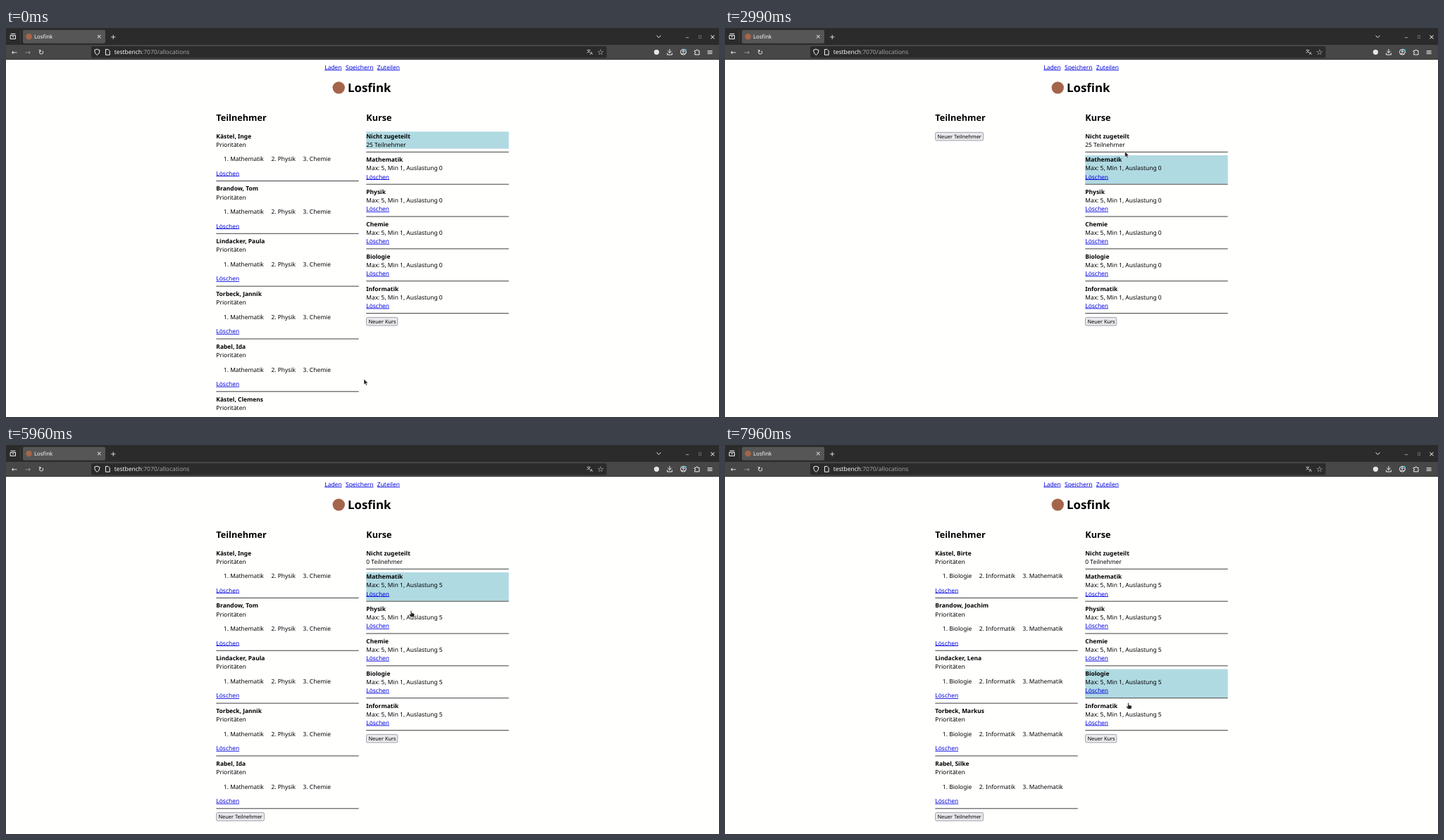
These frames come from a looping animation (1012x553 px, 7.99 s). An HTML page:

```html
<!DOCTYPE html>
<html lang="de">
<head>
<meta charset="utf-8">
<title>Losfink</title>
<style>
  html, body { margin: 0; width: 100%; height: 100%; overflow: hidden; background: #fff; }
  svg { display: block; width: 100vw; height: 100vh; }
  text { font: 16px "Noto Sans", sans-serif; text-rendering: geometricPrecision; white-space: pre; }
  .b { font-weight: 700; }
  .h1 { font-size: 32px; font-weight: 700; }
  .h2 { font-size: 24px; font-weight: 700; }
  .link { fill: #0000e0; text-decoration: underline; }
  .button { font-size: 14px; }
  .glyph { font-family: "DejaVu Sans", "Noto Sans CJK JP", sans-serif; fill: #f4f4f6; text-anchor: middle; }
  .icon { fill: none; stroke: #f4f4f6; stroke-linecap: round; stroke-linejoin: round; }
</style>
</head>
<body>
<svg viewBox="0 0 1012 553">
  <rect width="1012" height="553" fill="#fffffe"/>
  <g id="page" transform="scale(.52708)"></g>
  <rect id="scrollbar" x="1009.7" y="47" width="2.3" height="120" fill="#777"/>

  <!-- browser window -->
  <rect width="1012" height="24.5" fill="#2b2b2b"/>
  <rect y="24" width="1012" height="21" fill="#474747"/>
  <path d="M0 44.8H1012" stroke="#1c1c1c" stroke-width=".6"/>
  <path d="M20.5 4V20.5" stroke="#4a4a4a" stroke-width=".6"/>
  <rect x="24" y="2.8" width="117" height="19" rx="2.2" fill="#565656"/>
  <rect x="121" y="26" width="731.5" height="16.5" rx="2.2" fill="#2b2b2b"/>
  <circle cx="32.6" cy="12.2" r="4.3" fill="#a5654a"/>
  <text x="40" y="15" fill="#fbfbfe" style="font-size:7.8px">Losfink</text>
  <text x="153.7" y="37.2" fill="#fbfbfe" style="font-size:8.45px">testbench<tspan fill="#a3a3a3">:7070/allocations</tspan></text>
  <g id="glyphs"></g>
  <g class="icon">
    <path d="M6.5 10.5h7v5h-7zM7 8.3h6M9 12.6h2"/>
    <path d="M923.8 11l2.7 2.6 2.7-2.6"/>
    <path d="M129.4 30.2l3.6 1.3q0 5.3-3.6 6.8q-3.6-1.5-3.6-6.8z"/>
    <path d="M141.8 30.4h3.2l2.2 2.2v5.6h-5.4z"/>
    <path d="M942 30.3v5m-2.4-2.3l2.4 2.4 2.4-2.4M938.6 36v2h6.8v-2"/>
    <path d="M977.6 32.3h2q1.2-3.4 2.4 0h2v5.6h-6.4v-2q2.8-.9 0-1.8z"/>
    <circle cx="961.3" cy="34.2" r="3.9"/><circle cx="961.3" cy="33" r="1.2"/>
    <path d="M959 36.8q2.3-2.4 4.6 0"/>
  </g>
  <circle cx="923.4" cy="34.3" r="3.6" fill="#e6e6e8"/>
  <circle cx="964.6" cy="31.2" r="1.3" fill="#27c4e8"/>

  <g id="cursor" stroke="#fff" stroke-width=".5" stroke-linejoin="round" fill="#222">
    <path id="arrow" d="M0 0V8L1.9 6.3 3.2 9.2 4.6 8.6 3.4 5.8H5.9Z"/>
    <path id="hand" d="M-.8 .5Q0-.5 .8 .5V3.2L4 3.9Q4.9 4.2 4.8 5.2L4.2 8.8H-.7L-3 5.4Q-3 4.3-1.9 4.8L-.8 5.6Z"/>
  </g>
</svg>
<script>
const LOOP = 7990, HIGHLIGHT_LAG = 60;
// Page units: the page is laid out at full size and scaled down.
const SCALE = .52708, TOP = 279.5, LEFT = 566, RIGHT = 970, COLUMN = 384;
const FIRST_COURSE = TOP + 64, COURSE_STEP = 87, PERSON_STEP = 142;
const NAV_BOTTOM = 62;

const courses = ['Mathematik', 'Physik', 'Chemie', 'Biologie', 'Informatik'];
const surnames = ['Kästel', 'Brandow', 'Lindacker', 'Torbeck', 'Rabel'];
const firstNames = [
  'Inge', 'Tom', 'Paula', 'Jannik', 'Ida',
  'Clemens', 'Greta', 'Hanno', 'Ilka', 'Jens',
  'Judith', 'Emil', 'Helga', 'Arne', 'Knut',
  'Birte', 'Joachim', 'Lena', 'Markus', 'Silke'];

// Each move ends on something that is then clicked.
const rest = { x: 508, y: 499 };
const moves = [
  { from: 1140, to: 1920, click: 2180, x: 570.5, y: 207 },
  { from: 2720, to: 3360, click: 3440, x: 566, y: 160 },
  { from: 3530, to: 3880, click: 4740, x: 543, y: 57 },
  { from: 5140, to: 5540, click: 5640, x: 569, y: 204 },
  { from: 5700, to: 6220, click: 6300, x: 577, y: 246 },
  { from: 6370, to: 6900, click: 6980, x: 571.5, y: 290.5 },
  { from: 7200, to: 7400, click: 7640, x: 571, y: 338 },
  { from: 7700, to: 7960, click: LOOP, x: 572.5, y: 366.5 }];

const $ = id => document.getElementById(id);
const text = (x, y, content, cls = '') => `<text x="${x}" y="${y}" class="${cls}">${content}</text>`;
const line = (x, top, row, content, cls) => text(x, top + 17.5 + row * 23, content, cls);
const rule = (x, y) => `<rect x="${x}" y="${y}" width="${COLUMN}" height="2" fill="#484848"/>`;
const button = (x, y, width, label) =>
  `<rect x="${x + .5}" y="${y + 2}" width="${width}" height="22" rx="3.5" fill="#e9e9ed" stroke="#85858f" stroke-width="1.4"/>` +
  text(x + 6, y + 18, label, 'button');

function person(index, top) {
  const group = Math.floor(index / 5);
  const wishes = [0, 1, 2].map(n =>
    `<tspan dx="${n ? 20 : 0}">${n + 1}. ${courses[(group + n) % 5]}</tspan>`).join('');
  return line(LEFT, top, 0, `${surnames[index % 5]}, ${firstNames[index]}`, 'b') +
    line(LEFT, top, 1, 'Prioritäten') +
    text(LEFT + 20, top + 79.5, wishes) +
    text(LEFT, top + 118.5, 'Löschen', 'link') +
    rule(LEFT, top + 132);
}

const rowTop = row => row ? FIRST_COURSE + (row - 1) * COURSE_STEP : TOP;
const rowHeight = row => row ? 77 : 46;

function courseRow(row, selected, assigned) {
  const top = rowTop(row), height = rowHeight(row);
  const background = row === selected
    ? `<rect x="${RIGHT}" y="${top}" width="${COLUMN}" height="${height}" fill="#b0dae2"/>` : '';
  const body = row
    ? line(RIGHT, top, 0, courses[row - 1], 'b') +
      line(RIGHT, top, 1, `Max: 5, Min 1, Auslastung ${assigned ? 5 : 0}`) +
      line(RIGHT, top, 2, 'Löschen', 'link')
    : line(RIGHT, top, 0, 'Nicht zugeteilt', 'b') +
      line(RIGHT, top, 1, `${assigned ? 0 : 25} Teilnehmer`);
  return background + body + rule(RIGHT, top + (row ? 77 : 54));
}

function renderPage(first, count, selected, assigned) {
  const people = Array.from({ length: count }, (_, i) => person(first + i, TOP + i * PERSON_STEP));
  const rows = [0, 1, 2, 3, 4, 5].map(row => courseRow(row, selected, assigned));
  return text(858, 112, 'Laden', 'link') + text(914.5, 112, 'Speichern', 'link') + text(999.5, 112, 'Zuteilen', 'link') +
    '<circle cx="896" cy="161" r="16.5" fill="#a5654a"/>' +
    text(920, 172.5, 'Losfink', 'h1') +
    text(LEFT, 251, 'Teilnehmer', 'h2') + text(RIGHT, 251, 'Kurse', 'h2') +
    people.join('') + button(LEFT, TOP + count * PERSON_STEP, 129, 'Neuer Teilnehmer') +
    rows.join('') + button(RIGHT, rowTop(6), 84, 'Neuer Kurs');
}

function rowAt({ x, y }) {
  if (x < RIGHT * SCALE) return -1;
  const py = y / SCALE;
  return [0, 1, 2, 3, 4, 5].findIndex(row => py >= rowTop(row) && py < rowTop(row) + rowHeight(row));
}

// The selected row, and whether people have been assigned, after all clicks up to t.
function stateAt(t) {
  const clicked = moves.filter(move => move.click <= t);
  const rows = clicked.map(rowAt).filter(row => row >= 0);
  return { selected: rows.at(-1) ?? 0, assigned: clicked.some(move => move.y < NAV_BOTTOM) };
}

function pointerAt(t) {
  let { x, y } = rest;
  for (const move of moves) {
    const left = 1 - Math.min(1, Math.max(0, (t - move.from) / (move.to - move.from)));
    const eased = 1 - left * left;
    x += (move.x - x) * eased;
    y += (move.y - y) * eased;
  }
  return { x, y };
}

function drawGlyphs() {
  const glyph = (char, x, y, size) =>
    `<text class="glyph" x="${x}" y="${y + size * .33}" style="font-size:${size}px">${char}</text>`;
  $('glyphs').innerHTML =
    glyph('×', 132.2, 12.3, 9) + glyph('+', 152.2, 12.4, 10) +
    glyph('−', 967, 13.6, 7) + glyph('□', 985, 12.2, 5) + glyph('×', 1003, 12.3, 10) +
    glyph('←', 12, 34.2, 10) + `<g opacity=".5">${glyph('→', 31, 34.2, 10)}</g>` + glyph('↻', 50, 34.2, 10) +
    glyph('文', 827, 33.4, 6) + glyph('A', 831, 36, 5.5) + glyph('☆', 844, 34.2, 11) + glyph('≡', 999.2, 34.2, 11);
}

let shown = '';
function draw() {
  const t = (performance.now() - start) % LOOP;
  const { selected, assigned } = stateAt(t);
  const first = Math.max(0, selected - 1) * 5;
  const count = selected ? (assigned ? 5 : 0) : (assigned ? 0 : 6);
  const view = [first, count, stateAt(t - HIGHLIGHT_LAG).selected, assigned];
  if (String(view) !== shown) {
    shown = String(view);
    $('page').innerHTML = renderPage(...view);
  }

  const pointer = pointerAt(t);
  const hand = pointer.y < NAV_BOTTOM || rowAt(pointer) >= 0;
  $('cursor').setAttribute('transform', `translate(${pointer.x} ${pointer.y})`);
  $('hand').style.display = hand ? '' : 'none';
  $('arrow').style.display = hand ? 'none' : '';

  // The overlay scrollbar appears once the pointer moves over a long list.
  const lastClick = Math.max(0, ...moves.map(move => move.click).filter(click => click <= t));
  const moved = moves.some(move => move.from >= lastClick && move.from <= t);
  $('scrollbar').style.display = count > 5 && moved ? '' : 'none';
  requestAnimationFrame(draw);
}

const start = performance.now();
drawGlyphs();
draw();
</script>
</body>
</html>
```
